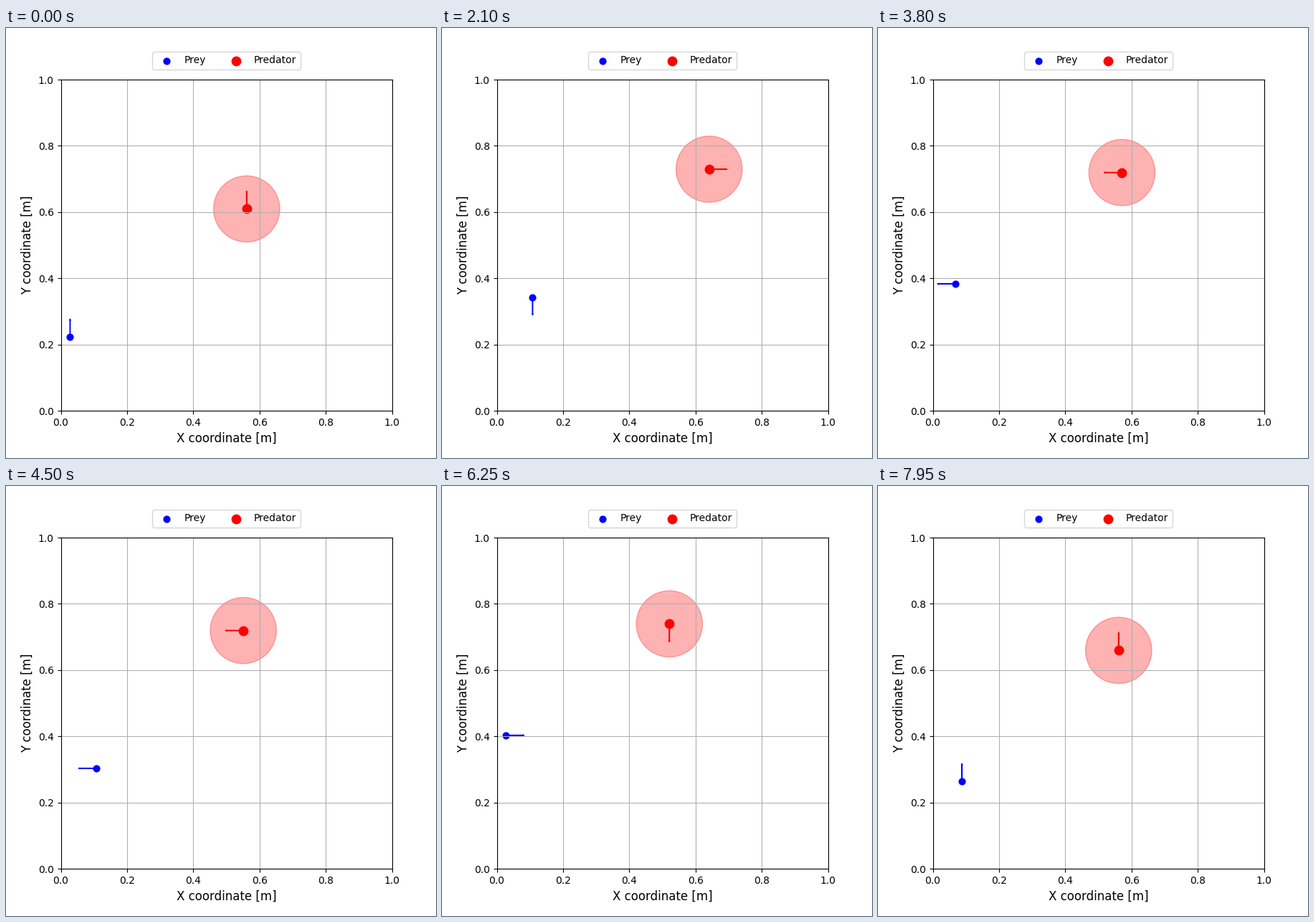
Animation, 600 px wide and 600 px high, one loop 8 s. Source, as a matplotlib script:

```python
import random

import matplotlib.pyplot as plt
from matplotlib.animation import FuncAnimation
from matplotlib.patches import Circle

FRAMES, INTERVAL = 160, 50
ARROW = 0.05
MOVES = {"R": (1, 0), "L": (-1, 0), "U": (0, 1), "D": (0, -1)}

# Key poses: frame, column and row in steps from the start, heading
PREY_KEYS = [
    (0, 0, 0, "U"), (17, 0, 1, "R"), (28, 5, 3, "U"), (39, 3, 4, "R"),
    (57, 6, 7, "L"), (64, 2, 4, "U"), (76, 2, 8, "L"), (92, 2, 4, "R"),
    (104, 6, 4, "L"), (125, 0, 9, "R"), (141, 0, 5, "D"), (159, 3, 2, "U"),
]
PREDATOR_KEYS = [
    (0, 0, 0, "U"), (17, 3, 4, "R"), (28, 7, 5, "U"), (34, 8, 8, "R"),
    (47, 7, 14, "D"), (57, 5, 14, "D"), (76, 1, 11, "L"), (104, -2, 12, "U"),
    (119, -4, 15, "U"), (125, -4, 13, "D"), (136, -2, 12, "D"),
    (159, 0, 5, "U"),
]


def bridge(rng, a, b, count, low, high):
    """Random string of moves from a to b inside their padded box."""
    dx, dy = b[0] - a[0], b[1] - a[1]
    net = ("R" if dx > 0 else "L") * abs(dx) + ("U" if dy > 0 else "D") * abs(dy)
    pairs = (count - len(net)) // 2
    box = [(min(p, q) - low, max(p, q) + high) for p, q in zip(a, b)]
    while True:
        steps = list(net + "".join(rng.choices(("RL", "UD"), k=pairs)))
        rng.shuffle(steps)
        pos, inside = a, True
        for s in steps:
            pos = shift(pos, s)
            inside = all(lo <= p <= hi for p, (lo, hi) in zip(pos, box))
            if not inside:
                break
        if inside:
            return "".join(steps)


def shift(pos, move):
    dx, dy = MOVES[move]
    return pos[0] + dx, pos[1] + dy


def walk(keys, seed, low, high):
    """One (cell, heading) pair per frame."""
    rng = random.Random(seed)
    moves = ""
    for (t0, x0, y0, head), (t1, x1, y1, _) in zip(keys, keys[1:]):
        first = shift((x0, y0), head)
        moves += head + bridge(rng, first, (x1, y1), t1 - t0 - 1, low, high)
    poses, pos = [], (0, 0)
    for move in moves + keys[-1][3]:
        poses.append((pos, MOVES[move]))
        pos = shift(pos, move)
    return poses


class Walker:
    def __init__(self, ax, label, color, size, start, step, poses, reach=0):
        self.ax, self.color = ax, color
        self.start, self.step, self.poses = start, step, poses
        self.dot = ax.scatter(*start, s=size, c=color, label=label)
        self.zone = None
        if reach:
            self.zone = ax.add_patch(Circle(start, reach, color=color, alpha=0.3))
        self.arrow = None

    def show(self, i):
        cell, (dx, dy) = self.poses[i]
        x, y = (s + self.step * c for s, c in zip(self.start, cell))
        self.dot.set_offsets([(x, y)])
        if self.zone:
            self.zone.center = x, y
        if self.arrow:
            self.arrow.remove()
        # The arrow points along the coming move
        self.arrow = self.ax.arrow(x, y, ARROW * dx, ARROW * dy,
                                   color=self.color)


fig, ax = plt.subplots(figsize=(6, 6), dpi=100)
ax.set_aspect("equal")
ax.set_xlim(0, 1)
ax.set_ylim(0, 1)
ax.set_xlabel("X coordinate [m]", fontsize=12)
ax.set_ylabel("Y coordinate [m]", fontsize=12)
ax.grid(True)

walkers = [
    Walker(ax, "Prey", "blue", 40, (0.028, 0.223), 0.02,
           walk(PREY_KEYS, 4, 0, 2)),
    Walker(ax, "Predator", "red", 80, (0.5612, 0.6094), 0.01,
           walk(PREDATOR_KEYS, 9, 2, 0), reach=0.1),
]
ax.legend(loc="upper center", bbox_to_anchor=(0.5, 1.1), ncol=2)


def update(i):
    for walker in walkers:
        walker.show(i)
    return []


anim = FuncAnimation(fig, update, frames=FRAMES, init_func=lambda: update(0),
                     interval=INTERVAL, repeat=True, repeat_delay=0)
plt.show()
```
